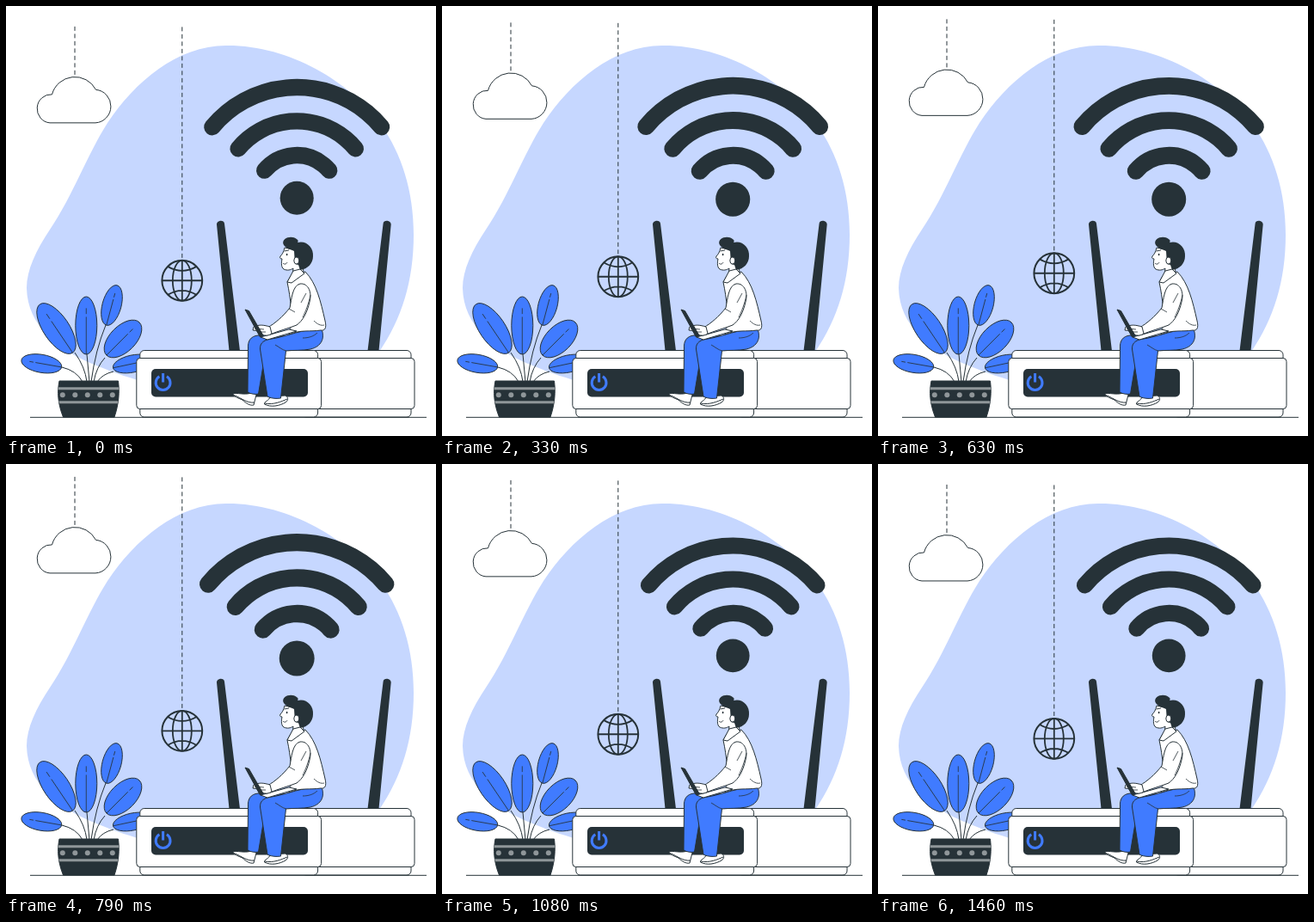
Recreate the animation shown at these times as an HTML page with a canvas. Size 500 px wide and 500 px high, loop 1500 ms.

```html
<!DOCTYPE html>
<html lang="en">
<head>
<meta charset="utf-8">
<title>Wireless router</title>
<style>
  html, body { margin: 0; width: 100%; height: 100%; overflow: hidden; background: #fff; }
  canvas { display: block; width: 500px; height: 500px; }
</style>
</head>
<body>
<canvas id="stage"></canvas>
<script>
const SIZE = 500, LOOP = 1500, FRAMES = 36;
const DARK = '#263238', BLUE = '#407bff', PALE = '#c6d7ff', GRAY = '#8f9699', WHITE = '#fff';
const canvas = document.getElementById('stage');
const ctx = canvas.getContext('2d');
const ratio = window.devicePixelRatio || 1;
canvas.width = canvas.height = SIZE * ratio;

function shape(path, fill, stroke = DARK, width = 1) {
  const p = typeof path === 'string' ? new Path2D(path) : path;
  if (fill) { ctx.fillStyle = fill; ctx.fill(p); }
  if (stroke) { ctx.strokeStyle = stroke; ctx.lineWidth = width; ctx.stroke(p); }
}

const line = (path, width = 1, color = DARK) => shape(path, null, color, width);

function ellipse(x, y, rx, ry = rx, turn = 0) {
  const p = new Path2D();
  p.ellipse(x, y, rx, ry, turn * Math.PI / 180, 0, Math.PI * 2);
  return p;
}

function box(x1, y1, x2, y2, radii) {
  const p = new Path2D();
  p.roundRect(x1, y1, x2 - x1, y2 - y1, radii);
  return p;
}

// Piecewise linear interpolation through [position, value] pairs
function keyframes(stops, at) {
  const i = Math.max(1, stops.findIndex(s => s[0] >= at));
  const [a, from] = stops[i - 1], [b, to] = stops[i];
  return from + (to - from) * (at - a) / (b - a);
}

const FLOAT = [[0, 0], [0.5, -10], [1, 0]];
const BEAT = [[0, 1], [0.1, 1.1], [0.3, 1], [0.4, 1], [0.5, 1.1], [0.6, 1], [1, 1]];

function backdrop() {
  shape('M258 46 C200 45 150 88 118 136 C95 172 77 222 51 260 C35 284 24 307 24 328 ' +
    'C25 372 60 400 105 418 C130 428 145 433 165 438 L410 438 L434 402 ' +
    'C460 364 474 320 474 266 C474 215 460 172 436 138 C400 88 330 46 258 46Z', PALE, null);
}

function hanging(dy) {
  ctx.save();
  ctx.translate(0, dy);
  ctx.setLineDash([5, 3.5]);
  line('M80 24 V83 M204.8 24.5 V295');
  ctx.setLineDash([]);
  shape('M51 136 A16 16.5 0 0 1 53.5 103 A27.5 27.5 0 0 1 104.5 97.5 A19 19.3 0 0 1 104 136Z', WHITE);
  line(ellipse(204.8, 319.4, 23.4), 2);
  line(ellipse(204.8, 319.4, 11, 23.4), 1.8);
  line('M204.8 296 V343 M181.4 319.4 H228.2 M188 303 Q204.8 313 221.6 303 M188 336 Q204.8 326 221.6 336', 1.8);
  ctx.restore();
}

function signal(scale) {
  const spread = 50.3 * Math.PI / 180, up = -Math.PI / 2;
  ctx.save();
  ctx.translate(338.2, 164);
  ctx.scale(scale, scale);
  ctx.lineCap = 'round';
  for (const radius of [48.5, 88, 127]) {
    const arc = new Path2D();
    arc.arc(0, 58, radius, up - spread, up + spread);
    line(arc, 19.2);
  }
  shape(ellipse(0, 58.8, 19.4), DARK, null);
  ctx.restore();
}

function plant() {
  line('M65 420 Q82 424 89 437 M80 403 Q92 420 94 437 M94 405 L97 437 ' +
    'M116 371 Q104 400 99 437 M115 409 Q105 420 102 437 M125 425 Q112 428 106 437');
  const leaves = [
    [41.3, 415.8, 23.7, 10.5, 10], [58.5, 375, 34, 15, 56], [93.3, 371.5, 33.5, 12.5, 90],
    [123, 348, 24, 11, 105], [136, 387, 27, 15, 135], [147, 416, 23, 10, 168]
  ];
  for (const [x, y, length, width, turn] of leaves) {
    shape(ellipse(x, y, length, width, turn), BLUE);
    ctx.save();
    ctx.translate(x, y);
    ctx.rotate(turn * Math.PI / 180);
    line(`M${-length * 0.6} 0 H${-length * 0.4} M${-length * 0.3} 0 H${length}`, 0.8);
    ctx.restore();
  }
  const pot = new Path2D('M62 436 H130.5 C132 448 131.5 462 126 478 H66.5 C60 462 59.5 448 62 436Z');
  shape(pot, DARK);
  ctx.save();
  ctx.clip(pot);
  line('M58 444.8 H134 M58 460.8 H134', 3, GRAY);
  for (let i = 0; i < 5; i++) shape(ellipse(65.8 + i * 14.5, 452.3, 3), GRAY, null);
  ctx.restore();
}

function routerModule(left, right) {
  shape(box(left + 4, 400.5, right - 4, 414, [5, 5, 0, 0]), WHITE);
  shape(box(left + 4, 464, right - 4, 478, [0, 0, 5, 5]), WHITE);
  shape(box(left, 409.5, right, 468.5, 4), WHITE);
}

function router() {
  shape('M245 254 C245 249 253.5 248 254 253 L272 401 H259.5Z', DARK, null);
  shape('M447.7 254 C447.7 249 439 248 438.6 253 L420.5 401 H433.5Z', DARK, null);
  routerModule(340, 475);
  routerModule(151.8, 366.6);
  shape(box(169, 422, 351, 454.5, 5), DARK, null);
  line('M178.3 430.8 A8.4 8.4 0 1 0 186.9 430.8 M182.6 427 V437.5', 3, BLUE);
  line('M28 478.3 H489');
}

function legs() {
  shape('M287 449 C280 453 272 450 265 450.5 C262 453 270 456 275 458 C279 462 284 465 288 464 L291 452Z', WHITE);
  line('M265 452.5 C274 456 280 462 289 461');
  shape('M307 454 C306 460 300 459 300.5 463 C308 467 318 465 325 461 C329 458 328 455 325 453Z', WHITE);
  line('M301 462 C311 464 320 460 327 457');
  shape('M325 384 L293 383 C284 384 281 390 281.5 398 L281 449 C284 451 290 452 293.5 451 L302 400Z', BLUE);
  shape('M367 376 C371 386 367 396 354 399 C344 401 334 400 325.5 401 L319.5 456 ' +
    'C314 457 307 456 304 454 L295.5 399 C295 391 301 388 309 387 C328 384 345 375 367 376Z', BLUE);
  line('M326 401 C321 400 317 396 313 394 M345 386 C352 386 358 384 362 380', 0.8);
}

function torso() {
  shape('M331 314 L348 309 C361 322 366 344 371 366 C373 374 371 378 366 377 ' +
    'C354 379 342 376 329 382 C334 362 331 340 327 321Z', WHITE);
  shape('M296 385 L329 376 L338 378 L304 388Z', WHITE);
  shape('M342 323 C352 322 356 334 353 344 C350 357 345 366 338 371 C328 375 316 378 307 382 ' +
    'L304 374 C313 369 322 361 330 351 C332 341 333 325 342 323Z', WHITE);
  line('M354 336 C352 346 348 356 345 362 M349 334 L343 345 M358 366 C362 370 366 372 370 371 M329 352 L336 356', 0.8);
  shape('M307 373 C300 371 295 370 288 373 L287 377 C292 377 294 379 297 382 C302 384 306 383 309 381Z', WHITE);
  line('M289 375 L300 376 M294 379 L302 379', 0.8);
  shape('M278 353 L282.5 354.5 L299 383 L295.5 385Z', DARK);
}

function head() {
  shape('M324 281 C323 286 321 289 319 291 C318 293 319 294 321 294 C320 299 320 304 323 306 ' +
    'C327 308 331 307 334 305 L333 313 L346 310 L343 285Z', WHITE);
  shape('M322.5 277 C320 270 332 266 338 271 C340 272 340 274 339 275 C349 272 358 281 357 291 ' +
    'C357 299 351 306 342 307 L340 301 L336 300 L335 285 C331 283 325 282 322.5 277Z', DARK, null);
  shape(ellipse(337.8, 296, 3, 4), WHITE);
  shape('M334 308 L327 321 L332 322 L347 311 L342 306Z', WHITE);
  line('M323.5 285 L329 284 M322 299 C324 301 326 300 327 298', 0.9);
  shape(ellipse(326.6, 289, 0.9, 1.2), DARK, null);
}

function draw(now) {
  // The picture advances in 24 even steps per second
  const step = Math.floor((now % LOOP + 4.5) * FRAMES / LOOP) % FRAMES;
  const phase = Math.min(1, (10 + step * 42.5) / LOOP);
  ctx.setTransform(ratio, 0, 0, ratio, 0, 0);
  ctx.fillStyle = WHITE;
  ctx.fillRect(0, 0, SIZE, SIZE);
  ctx.lineJoin = 'round';
  backdrop();
  hanging(keyframes(FLOAT, phase));
  signal(keyframes(BEAT, phase));
  plant();
  router();
  legs();
  torso();
  head();
}

let start;
function tick(now) {
  start ??= now;
  draw(now - start);
  requestAnimationFrame(tick);
}
draw(0);
requestAnimationFrame(tick);
</script>
</body>
</html>
```
